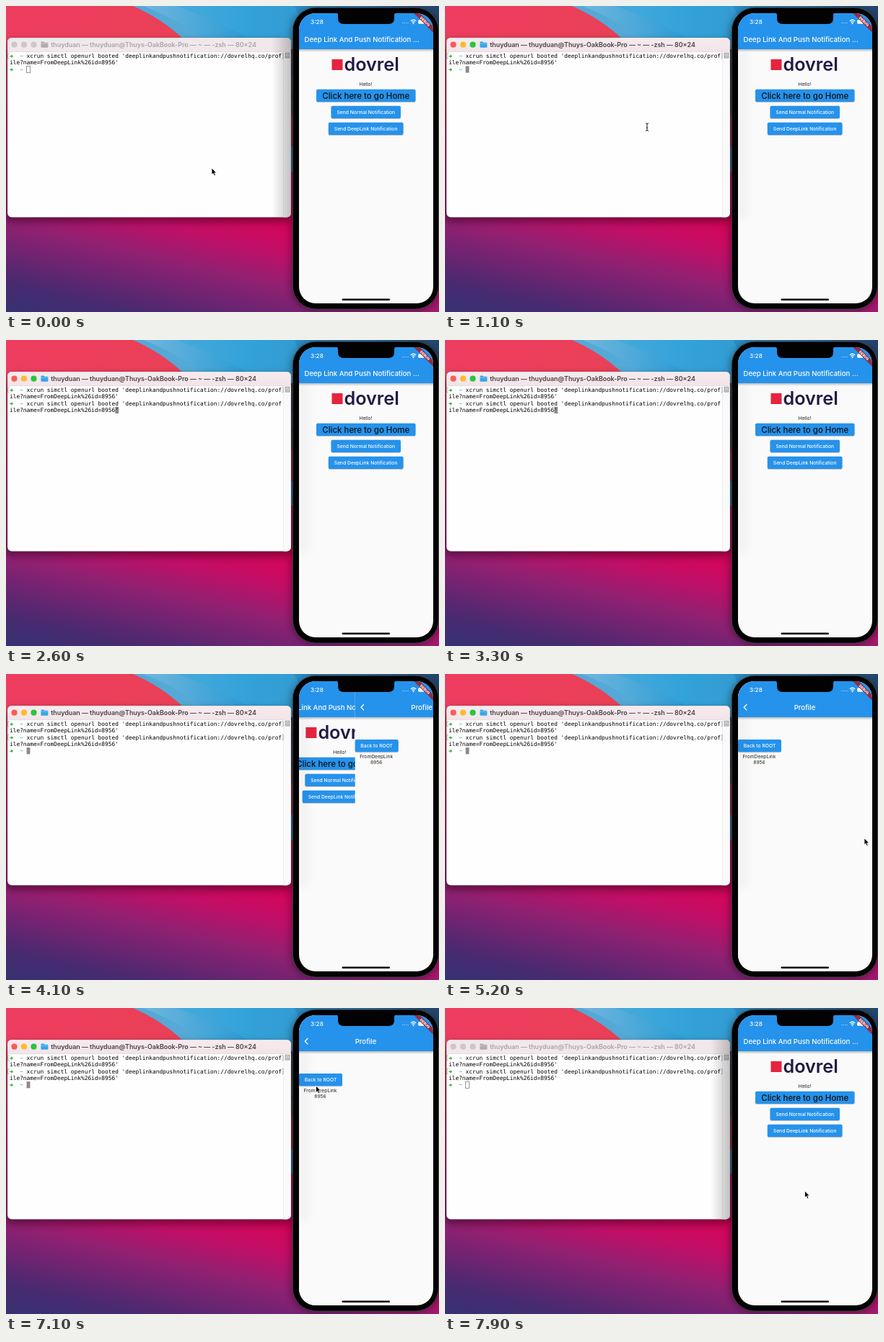
Write an HTML page that moves like this. It is 600x425 px and loops after 8 s.

```html
<!DOCTYPE html>
<html lang="en">
<head>
<meta charset="utf-8">
<title>Deep link demo</title>
<style>
  html, body { margin: 0; width: 100%; height: 100%; overflow: hidden; background: #5b226f; }
  svg { display: block; width: 100%; height: 100%; }
  text { font-family: Inter, Roboto, sans-serif; }
  .mono text { font: 7.84px "DejaVu Sans Mono", "Liberation Mono", monospace; white-space: pre; }
  .white { fill: #fff; font-weight: 500; }
  .bar { font-size: 9.6px; }
  .small { font-size: 6.68px; letter-spacing: .03px; }
  .mid { text-anchor: middle; }
</style>
</head>
<body>
<svg id="stage" viewBox="0 0 600 425" xmlns="http://www.w3.org/2000/svg"></svg>
<script>
const LOOP = 8000;
const COL = 4.72, ROW = 9.33, LEFT = 5, FIRST = 72;
const BLUE = '#2592eb';
const stage = document.getElementById('stage');

const linear = (id, stops, dir = 'x2="0" y2="1"') =>
  `<linearGradient id="${id}" ${dir}>${stops.map(([at, color, alpha = 1]) =>
    `<stop offset="${at}" stop-color="${color}" stop-opacity="${alpha}"/>`).join('')}</linearGradient>`;

const defs = `<defs>
  ${linear('lower', [[0, '#d6055a'], [.2, '#c20f67'], [.42, '#912072'], [.6, '#6f2471'], [.8, '#482a70'], [1, '#353272']],
    'gradientUnits="userSpaceOnUse" x1="340" y1="290" x2="293" y2="493"')}
  ${linear('red', [[0, '#ee3d60'], [.6, '#ea4057'], [1, '#dc3c42']], '')}
  ${linear('edge', [[0, '#e23a5c'], [.5, '#c02560'], [1, '#8a2070']])}
  ${linear('sky', [[0, '#70b6dd'], [.35, '#2b9cd5'], [.75, '#2d79af'], [1, '#244469']], '')}
  ${linear('chrome', [[0, '#f7ebee'], [1, '#f2e4e8']])}
  ${linear('phoneShade', [[0, '#000', 0], [1, '#000', .22]], '')}
  ${linear('termShade', [[0, '#000', .06], [1, '#000', 0]], '')}
  ${linear('barShade', [[0, '#000', .25], [1, '#000', 0]])}
  <clipPath id="screen"><rect x="406" y="10" width="186" height="403" rx="23"/></clipPath>
  <clipPath id="window"><rect x="2" y="44" width="393" height="249.5" rx="6"/></clipPath>
  <filter id="soft" x="-20%" y="-20%" width="140%" height="140%"><feGaussianBlur stdDeviation="6"/></filter>
  <filter id="lift" x="-10%" y="-30%" width="120%" height="170%">
    <feDropShadow dx="0" dy=".8" stdDeviation=".6" flood-opacity=".28"/></filter>
</defs>`;

const wallpaper = `
  <rect width="600" height="425" fill="url(#lower)"/>
  <rect y="40" width="12" height="260" fill="url(#edge)"/>
  <rect width="400" height="60" fill="url(#red)"/>
  <path d="M176 0Q215 17 246 46V60H600V0Z" fill="#54a9d6"/>
  <path d="M190 0Q236 17 275 48H600V0Z" fill="url(#sky)"/>
  <path d="M235 0Q300 22 340 48H420L400 0Z" fill="#3aa8dd" opacity=".55"/>
  <path d="M393 60h8v86h-8z" fill="#33384a"/>
  <path d="M393 146h8v50h-8z" fill="#b02a4c"/>
  <path d="M393 196h8v34h-8z" fill="#3f7fae"/>
  <rect x="396" y="4" width="205" height="418" rx="33" filter="url(#soft)" opacity=".45"/>`;

const light = (x, color) => `<circle cx="${x}" cy="53.7" r="4.1" fill="${color}"/>`;
const chrome = (id, fill, ink, lights, folder) => `<g id="${id}">
  <rect x="2" y="44" width="393" height="19.5" fill="${fill}"/>
  ${[11.5, 25, 38.5].map((x, i) => light(x, lights[i])).join('')}
  <path d="M48.5 50.5q0-1 1-1h2.7l1.2 1.2h4q1 0 1 1v5q0 1-1 1h-8q-1 0-1-1z" fill="${folder}"/>
  <path d="M48.5 52.3h9.9" stroke="#fff" stroke-opacity=".45" stroke-width=".7"/>
  <text x="204.5" y="56.8" class="mid" font-size="8.87" font-weight="600" fill="${ink}">thuyduan — thuyduan@Thuys-OakBook-Pro — ~ — -zsh — 80×24</text>
</g>`;

const baseline = row => FIRST + row * ROW;
const line = (row, col, text, extra = '') =>
  `<text x="${LEFT + col * COL}" y="${baseline(row)}" ${extra}>${text}</text>`;
const prompt = row => `
  <path d="M${LEFT + .2} ${baseline(row) - 2.8}h2.2v-1.9l2.6 2.5l-2.6 2.5v-1.9h-2.2z" fill="#2fae3e"/>
  ${line(row, 3, '~', 'fill="#2ba7b0" font-weight="bold"')}`;
const command = row => line(row, 5, "xcrun simctl openurl booted 'deeplinkandpushnotification://dovrelhq.co/prof")
  + line(row + 1, 0, "ile?name=FromDeepLink%26id=8956'");
const brackets = row => `<g fill="none" stroke="#8b8b8b" stroke-width=".7">
  <path d="M4.5 ${baseline(row) - 6.2}h-1.6v7.2h1.6M382.6 ${baseline(row) - 6.2}h1.4v7.2h-1.4"/></g>`;

const terminal = `
  <rect x="0" y="49" width="397" height="251" rx="8" filter="url(#soft)" opacity=".4"/>
  <g clip-path="url(#window)">
    <rect x="2" y="44" width="393" height="250" fill="#fefefe"/>
    ${chrome('chromeOn', 'url(#chrome)', '#454043', ['#fc5b57', '#fdbc2f', '#2ac53f'], '#35a7e8')}
    ${chrome('chromeOff', '#f1e8eb', '#aaa3a7', ['#d0c6ca', '#d0c6ca', '#d0c6ca'], '#b2aaae')}
    <path d="M2 63.6H395" stroke="#d8cdd1" stroke-width=".6"/>
    <rect x="384.5" y="64" width="11" height="230" fill="#f9f9f9"/>
    <path d="M384.5 64V294" stroke="#e3e3e3" stroke-width=".6"/>
    <rect x="387.2" y="65.5" width="5.6" height="6.5" fill="#fff" stroke="#777" stroke-width=".8"/>
    <path d="M388.2 67.5h3.6M388.2 69h3.6M388.2 70.4h3.6" stroke="#777" stroke-width=".7"/>
    <rect id="block" width="4.8" height="9.2"/>
    <g class="mono">
      ${prompt(0)}${command(0)}${brackets(0)}${prompt(2)}
      <g id="second">${command(2)}</g>
      <g id="done">${brackets(2)}${prompt(4)}</g>
    </g>
    <rect id="overPhoneShade" x="368" y="44" width="27" height="250" fill="url(#phoneShade)"/>
  </g>
  <rect x="2" y="44" width="393" height="249.5" rx="6" fill="none" stroke="#000" stroke-opacity=".22" stroke-width=".6"/>`;

const button = (x, y, w, label, look = 'class="white small mid"', drop = 11) => `
  <rect x="${x}" y="${y}" width="${w}" height="17.2" rx="1.9" fill="${BLUE}" filter="url(#lift)"/>
  <text x="${x + w / 2}" y="${y + drop}" ${look}>${label}</text>`;
const page = (id, content) => `<g id="${id}">
  <rect x="406" y="10" width="186" height="403" fill="#fafafa"/>
  <rect x="406" y="60" width="186" height="4" fill="url(#barShade)"/>
  <rect x="406" y="10" width="186" height="50" fill="${BLUE}"/>${content}</g>`;

const home = page('home', `
  <text x="413.5" y="49.5" class="white bar">Deep Link And Push Notification ...</text>
  <rect x="451.5" y="74" width="15" height="15" fill="#e5243f"/>
  <text x="468.5" y="90" font-size="25.2" font-weight="600" fill="#211a45">dovrel</text>
  <text x="498.5" y="111.3" class="small mid" fill="#222">Hello!</text>
  ${button(430, 115.7, 137.5, 'Click here to go Home', 'class="mid" font-size="11.45" font-weight="500" fill="#111"', 12.8)}
  ${button(450.5, 138.8, 96.5, 'Send Normal Notification')}
  ${button(446.8, 161.7, 103.7, 'Send DeepLink Notification')}`);
const profile = page('profile', `
  <path d="M418.3 42l-4 4.2l4 4.2" fill="none" stroke="#fff" stroke-width="1.3"/>
  <text x="498.5" y="49.5" class="white bar mid">Profile</text>
  ${button(406, 91, 60, 'Back to ROOT')}
  <text x="435.5" y="117.3" class="small mid" fill="#222">FromDeepLink</text>
  <text x="435.5" y="125.4" class="small mid" fill="#222">8956</text>`);

const phone = `
  <path d="M396.4 66v13M396.4 98v24M396.4 129v24" stroke="#26262a" stroke-width="2"/>
  <rect x="397.3" y="2.3" width="202.2" height="418.7" rx="32" fill="#020203" stroke="#44444a" stroke-width=".9"/>
  <g clip-path="url(#screen)">
    ${home}${profile}
    <path d="M456 9q4 0 4 4v4q0 8 8 8h62q8 0 8-8v-4q0-4 4-4z" fill="#020203"/>
    <text x="422" y="25" font-size="8.2" font-weight="500" fill="#fff">3:28</text>
    <path d="M549 23.5h9" stroke="#fff" stroke-opacity=".6" stroke-width="1.2" stroke-dasharray="1.2 1.3"/>
    <g fill="none" stroke="#fff" stroke-width="1.2">
      <path d="M560.8 20.9q3.7-3.3 7.4 0M562.4 22.6q2.1-1.9 4.2 0"/></g>
    <circle cx="564.5" cy="24.2" r="1" fill="#fff"/>
    <rect x="571.2" y="19.2" width="10.4" height="5.6" rx="1.5" fill="#fff"/>
    <g transform="translate(580.6 21.4) rotate(45)">
      <rect x="-20" y="-2.9" width="40" height="5.8" fill="#8e2f47"/>
      <text y="1.8" class="mid" font-size="4.9" font-weight="800" fill="#fff">DEBUG</text>
    </g>
    <rect x="465.5" y="406.4" width="66.5" height="2.6" rx="1.3" fill="#050505"/>
    <rect id="overTermShade" x="406" y="60" width="17" height="236" fill="url(#termShade)" filter="url(#soft)"/>
  </g>`;

const pointers = `
  <path id="arrow" d="M0 0V9.3L2.1 7.4L3.6 10.8L5.3 10L3.8 6.8H6.7Z" fill="#000" stroke="#fff" stroke-width=".8"/>
  <path id="beam" d="M-2-5.2q2 0 2 1.4q0-1.4 2-1.4M0-4V4.4M-2 5.4q2 0 2-1.4q0 1.4 2 1.4M-1.2 1.2h2.4" fill="none" stroke="#222" stroke-width="1"/>`;

stage.innerHTML = defs + wallpaper + terminal + phone + pointers;
const part = Object.fromEntries([...stage.querySelectorAll('[id]')].map(el => [el.id, el]));

const clamp = v => Math.max(0, Math.min(1, v));
const progress = (t, from, to) => clamp((t - from) / (to - from));
const smooth = p => p * p * (3 - 2 * p);
const show = (el, on) => el.setAttribute('visibility', on ? 'visible' : 'hidden');
const move = (el, x, y) => el.setAttribute('transform', `translate(${x} ${y})`);

// Each stop: time of departure, time of arrival, x, y.
const path = [
  [0, 0, 285, 225], [200, 700, 280, 168], [4350, 5100, 581, 228],
  [5700, 6800, 429.5, 108], [7400, 7850, 498.5, 254]
];
function pointerAt(t) {
  let [, , x, y] = path[0];
  for (const [from, to, nextX, nextY] of path.slice(1)) {
    const p = smooth(progress(t, from, to));
    x += (nextX - x) * p;
    y += (nextY - y) * p;
  }
  return [x, y];
}

function draw(t) {
  const active = t >= 750 && t < 7250;
  const recalled = t >= 2600, done = t >= 3800;
  show(part.chromeOn, active);
  show(part.chromeOff, !active);
  show(part.overTermShade, active);
  show(part.overPhoneShade, !active);
  show(part.second, recalled);
  show(part.done, done);

  const [row, col] = done ? [4, 5] : recalled ? [3, 31] : [2, 5];
  move(part.block, LEFT + col * COL, baseline(row) - 7.2);
  part.block.setAttribute('fill', active ? '#8f878b' : '#fff');
  part.block.setAttribute('stroke', active ? 'none' : '#777');
  part.block.setAttribute('stroke-width', .8);

  const entering = 1 - (1 - progress(t, 4000, 4400)) ** 3;
  const leaving = 1 - (1 - progress(t, 7250, 7650)) ** 3;
  const open = entering - leaving;
  move(part.home, -62 * open, 0);
  move(part.profile, 186 * (1 - open), 0);
  show(part.profile, open > 0);

  const [x, y] = pointerAt(t);
  const typing = t >= 2600 && t < 4350;
  const overText = active && x < 384;
  move(part.arrow, x, y);
  move(part.beam, x, y);
  show(part.arrow, !typing && !overText);
  show(part.beam, !typing && overText);
}

const start = performance.now();
function tick() {
  draw((performance.now() - start) % LOOP);
  requestAnimationFrame(tick);
}
tick();
</script>
</body>
</html>
```
